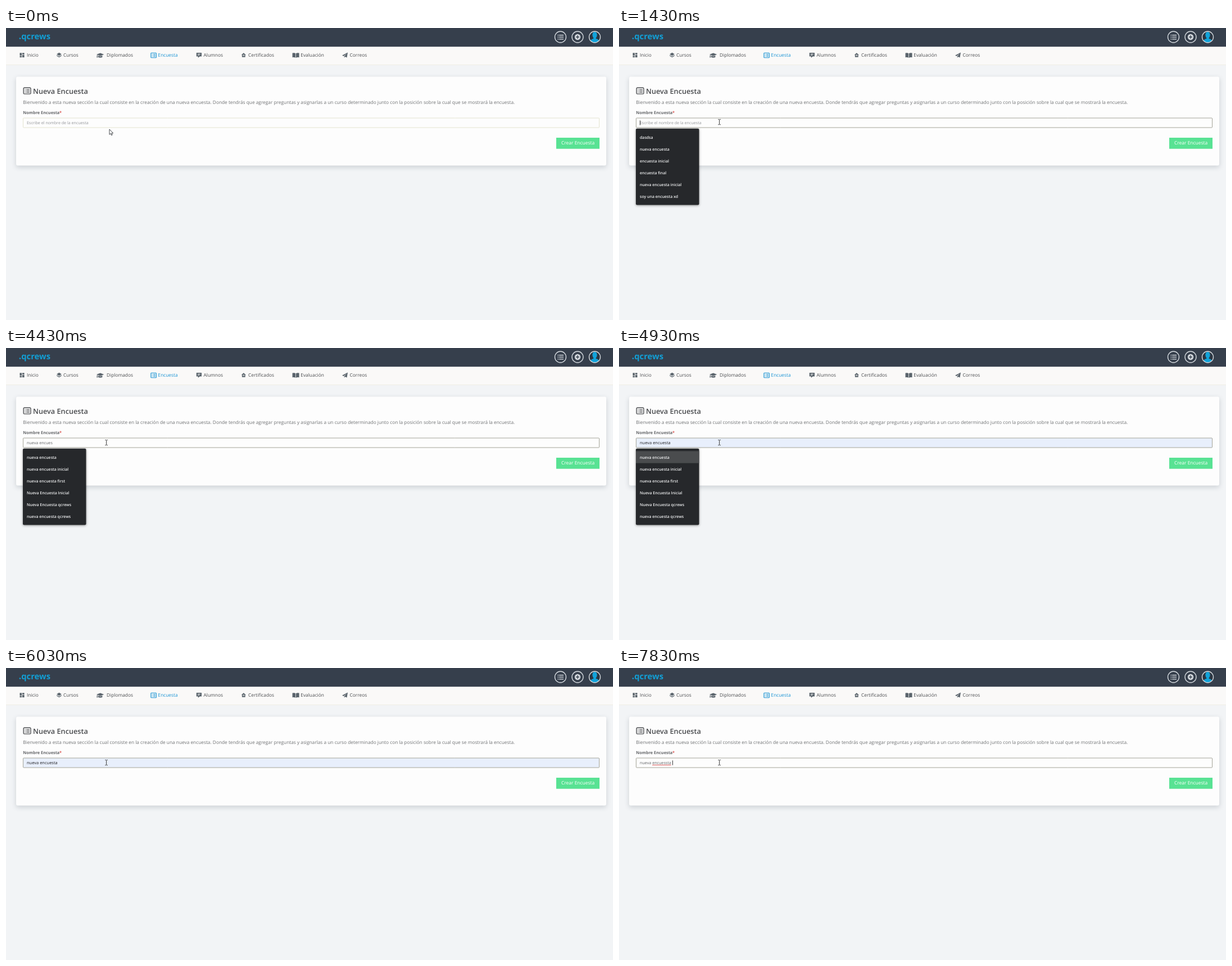
Write an HTML page with a canvas that moves like this. It is 1080x519 px and loops after 8 s.

```html
<!DOCTYPE html>
<html lang="es">
<head>
<meta charset="utf-8">
<title>Nueva Encuesta</title>
<style>
  html, body { margin: 0; width: 100%; height: 100%; overflow: hidden; background: #f2f4f6; }
  canvas { display: block; width: 1080px; height: 519px; }
</style>
</head>
<body>
<canvas id="stage" width="1080" height="519"></canvas>
<script>
const ctx = document.getElementById('stage').getContext('2d');
const LOOP = 8000;
const FONT = '"Open Sans", "Noto Sans", sans-serif';
const BLUE = '#1a94d4', SLATE = '#5a646c', INK = '#4b4d50';
const BRAND = 'qcrews';
const INPUT_SIZE = 7.18;

const RECENT = ['dasdsa', 'nueva encuesta', 'encuesta inicial', 'encuesta final',
  'nueva encuesta inicial', 'soy una encuesta xd'];
const MATCHES = ['nueva encuesta', 'nueva encuesta inicial', 'nueva encuesta first',
  'Nueva Encuesta Inicial', 'Nueva Encuesta ' + BRAND, 'nueva encuesta ' + BRAND];

// [time, content of the field]
const TYPING = [[0, ''], [2430, 'n'], [2560, 'nu'], [2700, 'nue'], [2830, 'nuev'],
  [2960, 'nueva'], [3130, 'nueva '], [3330, 'nueva e'], [3430, 'nueva en'],
  [3530, 'nueva enc'], [3600, 'nueva encu'], [3670, 'nueva encue'],
  [4410, 'nueva encues'], [4750, 'nueva encuesta'], [6400, 'nueva encuest'],
  [6500, 'nueva encues'], [7230, 'nueva encuess'], [7430, 'nueva encuesst'],
  [7600, 'nueva encuessta'], [7800, 'nueva encuessta ']];
const CARET_ON = [[370, 930], [1430, 1930], [2430, 3870], [4460, 4750],
  [6640, 7130], [7230, 8000]];

const within = (t, a, b) => t >= a && t < b;
const clamp = x => Math.max(0, Math.min(1, x));
const ease = x => x * x * (3 - 2 * x);
const mix = (a, b, k) => a + (b - a) * k;

function setFont(size, weight = 400) {
  ctx.font = `${weight} ${size}px ${FONT}`;
  ctx.textRendering = 'geometricPrecision';
}

function text(str, x, y, size, color, weight) {
  setFont(size, weight);
  ctx.fillStyle = color;
  ctx.fillText(str, x, y);
}

function rect(x, y, w, h, color) {
  ctx.fillStyle = color;
  ctx.fillRect(x, y, w, h);
}

function rounded(x, y, w, h, r, fill, stroke, line = 1) {
  ctx.beginPath();
  ctx.roundRect(x, y, w, h, r);
  if (fill) { ctx.fillStyle = fill; ctx.fill(); }
  if (stroke) { ctx.strokeStyle = stroke; ctx.lineWidth = line; ctx.stroke(); }
}

function disc(x, y, r, fill, stroke, line = 1) {
  ctx.beginPath();
  ctx.arc(x, y, r, 0, Math.PI * 2);
  if (fill) { ctx.fillStyle = fill; ctx.fill(); }
  if (stroke) { ctx.strokeStyle = stroke; ctx.lineWidth = line; ctx.stroke(); }
}

function shape(d, x, y, fill, stroke, line = 1) {
  const path = new Path2D(d);
  ctx.save();
  ctx.translate(x, y);
  if (fill) { ctx.fillStyle = fill; ctx.fill(path); }
  if (stroke) { ctx.strokeStyle = stroke; ctx.lineWidth = line; ctx.stroke(path); }
  ctx.restore();
}

function shadowed(blur, dy, color, draw) {
  ctx.save();
  ctx.shadowBlur = blur;
  ctx.shadowOffsetY = dy;
  ctx.shadowColor = color;
  draw();
  ctx.restore();
}

function listLines(x, y, w, gap, color, h = 1) {
  for (let i = 0; i < 3; i++) {
    rect(x, y + i * gap, h + 0.3, h, color);
    rect(x + 2.6, y + i * gap, w - 2.6, h, color);
  }
}

function drawHeader() {
  rect(0, 0, 1080, 33.5, '#363f4c');
  disc(25, 18.6, 1.4, '#129fd5');
  text(BRAND, 27.2, 20, 14.8, '#129fd5', 700);
  const ring = '#d3d8dd';
  for (const x of [986.5, 1017]) disc(x, 16, 10, null, ring, 1.4);
  listLines(981.5, 12, 10.5, 3.5, ring, 1.4);
  disc(1017, 16, 5.2, ring);
  rect(1014, 15.3, 6, 1.4, '#363f4c');
  rect(1016.3, 13, 1.4, 6, '#363f4c');

  ctx.save();
  ctx.beginPath();
  ctx.arc(1047.5, 16, 10, 0, Math.PI * 2);
  ctx.clip();
  rect(1037, 5, 21, 22, '#2c3541');
  shape('M0-9C5-9 5-1 2.2 1.6V3C6 4 8 5 8.5 11H-8.5C-8 5-6 4-2.2 3V1.6C-5-1-5-9 0-9Z',
    1047.5, 16, '#12a3da');
  ctx.restore();
  disc(1047.5, 16, 10, null, ring, 1.4);
}

const NAV = [
  ['Inicio', 37, () => {
    rect(24.5, 44.3, 3.6, 4.6, SLATE); rect(29, 44.3, 3.6, 2.8, SLATE);
    rect(24.5, 49.6, 3.6, 2.6, SLATE); rect(29, 47.9, 3.6, 4.3, SLATE);
  }],
  ['Cursos', 102, () => {
    shape('M0 2.8L4.3 0 8.6 2.8 4.3 5.6Z', 90.2, 43.8, SLATE);
    shape('M0 0L4.3 2.8 8.6 0V1.5L4.3 4.3 0 1.5Z', 90.2, 48, SLATE);
  }],
  ['Diplomados', 179, () => {
    shape('M0 2.6L6.7 0 13.4 2.6 6.7 5.2Z', 161, 44.5, SLATE);
    shape('M3 4.6L6.7 6 10.4 4.6V7.4Q6.7 9 3 7.4ZM1 3.5H1.8L2.3 8H.4Z', 161, 44.5, SLATE);
  }],
  ['Encuesta', 270.5, () => {
    rounded(257.8, 44.3, 9.6, 8.4, 1, null, BLUE, 1.1);
    listLines(259.3, 46, 6.6, 2, BLUE, 0.9);
  }],
  ['Alumnos', 351.5, () => {
    shape('M0 0H9.2V6.4H6L3 9V6.4H0Z', 338.8, 44, SLATE);
    rect(341, 45.8, 5, 0.9, '#faf9f8'); rect(341, 47.7, 3.4, 0.9, '#faf9f8');
  }],
  ['Certificados', 431, () => {
    shape('M0 3.5L4 0 8 3.5H6.9V7.6H1.1V3.5Z', 418.8, 44.2, SLATE);
    disc(422.8, 48.4, 1.5, '#faf9f8');
    rect(422.4, 47.3, 0.9, 2.4, SLATE);
  }],
  ['Evaluación', 524.3, () => {
    shape('M0 .6Q3.4-.3 5.6 1V9Q3.4 7.6 0 8.3ZM12 .6Q8.6-.3 6.4 1V9Q8.6 7.6 12 8.3Z',
      509.6, 44, SLATE);
  }],
  ['Correos', 611.5, () => {
    shape('M10 0L8.5 9 5.2 7.5 3.8 9.4V6.8L8.2 2 2.7 6.3 0 5.2Z', 598, 43.6, SLATE);
  }]
];

function drawNav() {
  rect(0, 33.5, 1080, 31.5, '#faf9f8');
  rect(0, 65, 1080, 1, '#efeee4');
  for (const [label, x, icon] of NAV) {
    icon();
    text(label, x, 51, 8.35, label === 'Encuesta' ? BLUE : INK);
  }
}

function drawCard() {
  shadowed(9, 3, 'rgba(70,80,95,.22)', () => rounded(18, 86.5, 1050, 158, 3, '#fdfdfd'));
  rounded(31.2, 106.3, 12.8, 10.8, 1.4, null, INK, 1.4);
  listLines(33.4, 108.8, 8.6, 2.5, INK, 1.1);
  text('Nueva Encuesta', 48, 116.7, 12.7, '#47494c', 600);
  text('Bienvenido a esta nueva sección la cual consiste en la creación de una nueva ' +
    'encuesta. Donde tendrás que agregar preguntas y asignarlas a un curso determinado ' +
    'junto con la posición sobre la cual que se mostrará la encuesta.',
    30.3, 135, 8.32, '#707274');
  text('Nombre Encuesta', 30.3, 153.3, 7.35, '#66686b', 700);
  text('*', 94.9, 153.3, 7.35, '#d9534f', 700);
  rect(979, 195, 77, 19.7, '#58e293');
  text('Crear Encuesta', 988, 207.2, 8.45, '#ffffff');
}

function drawField(t) {
  const value = TYPING.findLast(([start]) => t >= start)[1];
  const filled = within(t, 4750, 6400);
  const focus = clamp((t - 330) / 150);
  const border = `rgb(${mix(228, 164, focus)},${mix(228, 164, focus)},${mix(208, 152, focus)})`;
  rounded(30.5, 160, 1025, 17, 1, filled ? '#e8effc' : '#fdfdfd', border);

  if (!value) text('Escribe el nombre de la encuesta', 37, 170.8, 7.15, '#94969a');
  else text(value, 37, 170.8, filled ? 7.5 : INPUT_SIZE, filled ? '#202124' : '#606265');

  setFont(INPUT_SIZE);
  if (t >= 6500) {
    const from = 37 + ctx.measureText('nueva ').width;
    const to = 37 + ctx.measureText(value.trimEnd()).width;
    rect(from, 172, to - from, 0.9, '#dc4c4c');
  }
  if (CARET_ON.some(([a, b]) => within(t, a, b))) {
    rect(Math.round(37 + ctx.measureText(value).width), 164.3, 1, 8.4, '#3c3c3c');
  }
}

function drawSuggestions(t) {
  if (!within(t, 390, 5690) && !within(t, 6650, 7300)) return;
  shadowed(4, 1, 'rgba(0,0,0,.4)', () => rounded(30, 178.8, 112.5, 135.7, 2, '#26282b'));
  if (within(t, 4750, 5690)) rect(30, 183.3, 112.5, 21.3, '#4a4c4e');
  (t < 2480 ? RECENT : MATCHES).forEach((item, i) =>
    text(item, 37, 196.6 + i * 21.15, 6.98, '#f1f2f3', 600));
}

function drawPointer(t) {
  const k = ease(clamp((t - 30) / 270));
  const x = mix(184, 178.6, k), y = mix(180, 167.3, k);
  if (y > 177) {
    shape('M0 0V9.4L2.2 7.5 3.7 10.7 5.2 10 3.8 6.9H6.7Z', x, y, '#ffffff', '#33363a', 0.9);
  } else {
    const top = y - 4.8 + (t >= 1670 ? 1 : 0);
    shape('M-2.3 0H-.7L0 .7 .7 0H2.3M0 .7V8.5M-2.3 9.2H-.7L0 8.5 .7 9.2H2.3',
      x, top, null, '#3a3a3a', 1);
  }
  if (within(t, 330, 600)) {
    ctx.globalAlpha = 1 - clamp((t - 450) / 150);
    disc(172.6, 161.5, 8.7, '#5b8bcd', '#4d7fc4', 0.8);
    ctx.globalAlpha = 1;
  }
}

function frame(now) {
  const t = now % LOOP;
  rect(0, 0, 1080, 519, '#f2f4f6');
  drawHeader();
  drawNav();
  drawCard();
  drawField(t);
  drawSuggestions(t);
  drawPointer(t);
  requestAnimationFrame(frame);
}

const start = performance.now();
frame(0);
function tick() { return performance.now() - start; }
</script>
</body>
</html>
```
